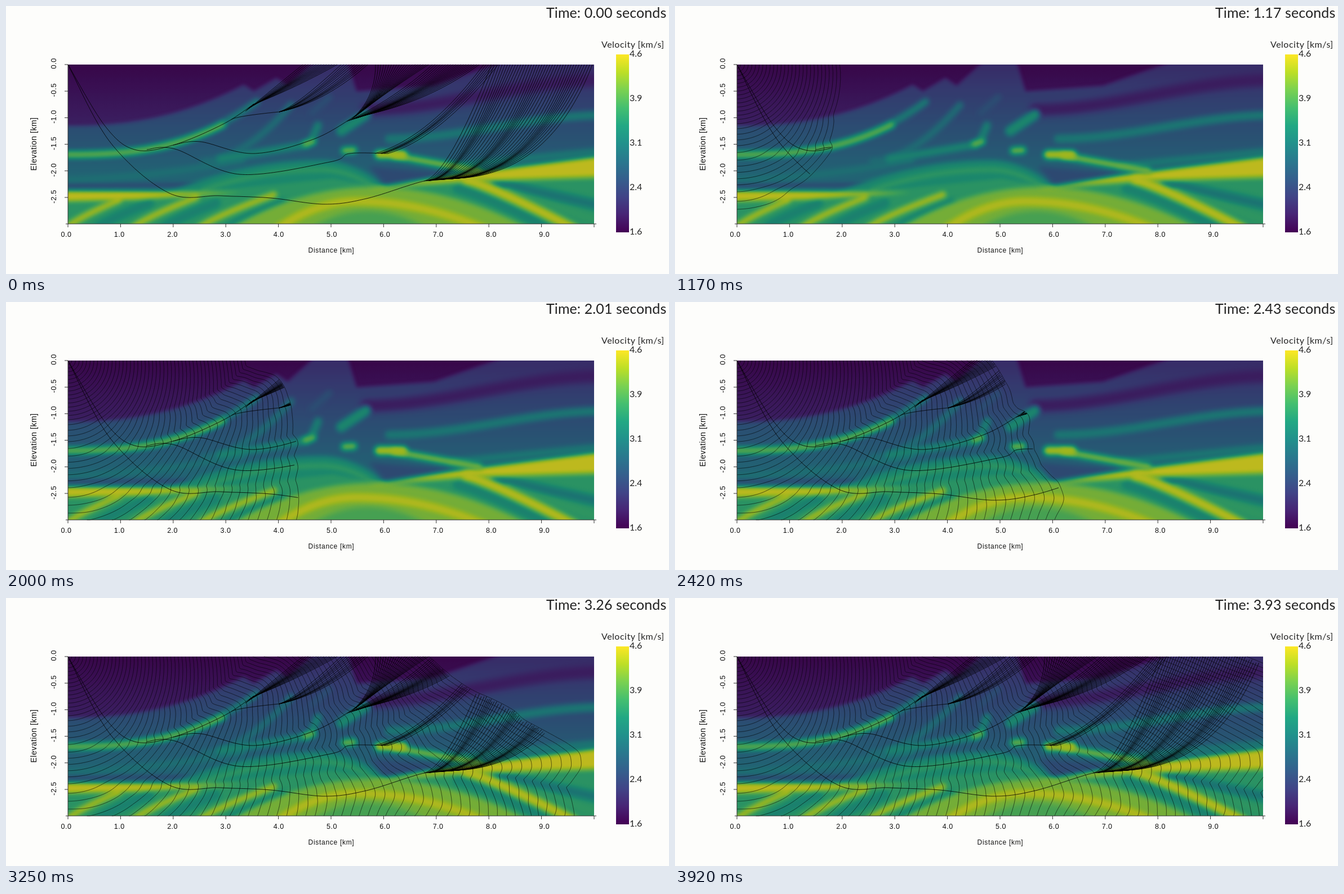
An HTML page with a canvas that plays this animation: 1177x476 px, repeating every 4010 ms.

```html
<!DOCTYPE html>
<html lang="en">
<head>
<meta charset="utf-8">
<title>Seismic rays and wavefronts</title>
<style>
  html, body { margin: 0; width: 100%; height: 100%; overflow: hidden; background: #fdfdfb; }
  #field { position: absolute; left: 110px; top: 104px; }
  svg { position: absolute; left: 0; top: 0; }
  .axis { font-family: "Liberation Sans", Arial, sans-serif; fill: #111; letter-spacing: .5px; }
  .bar { font-family: Lato, "Open Sans", sans-serif; fill: #222; }
</style>
</head>
<body>
<canvas id="field" width="934" height="283"></canvas>
<svg id="stage" width="1177" height="476" viewBox="0 0 1177 476">
  <defs><linearGradient id="scale" x1="0" y1="1" x2="0" y2="0"></linearGradient></defs>
  <g id="fronts" fill="none" stroke="#000" stroke-width=".75" stroke-opacity=".75"></g>
  <path id="rays" fill="none" stroke="#000" stroke-width=".8"/>
  <path id="ticks" fill="none" stroke="#333" stroke-width="1"/>
  <rect x="1083" y="86" width="23" height="316" fill="url(#scale)"/>
  <g id="labels"></g>
  <text class="axis" x="577.5" y="438" font-size="12" text-anchor="middle" style="letter-spacing:.7px">Distance [km]</text>
  <text class="axis" font-size="14" text-anchor="middle" transform="translate(54 245) rotate(-90)">Elevation [km]</text>
  <text class="bar" x="1057" y="74" font-size="16" letter-spacing=".5">Velocity [km/s]</text>
  <text class="bar" id="clock" x="959" y="21" font-size="25" letter-spacing=".1"></text>
</svg>
<script>
const LEFT = 110, TOP = 104, W = 934, H = 283, KM = 93.5;
const STEP = 0.0837, LAST = 47, LOOP = 4010;
const VMIN = 1.6, VSPAN = 3;
const NS = 'http://www.w3.org/2000/svg';
const $ = id => document.getElementById(id);
const mix = (a, b, f) => a + (b - a) * f;
const mixPoint = (a, b, f) => [mix(a[0], b[0], f), mix(a[1], b[1], f)];

function add(parent, tag, attrs, text) {
  const el = document.createElementNS(NS, tag);
  for (const k in attrs) el.setAttribute(k, attrs[k]);
  if (text) el.textContent = text;
  parent.appendChild(el);
  return el;
}

/* ---- curves, all returned as dense point lists ---- */
const sample = (n, f) => Array.from({ length: n + 1 }, (_, i) => f(i / n));
const pow = e => u => u ** e;
const ess = u => u * u * (3 - 2 * u);

const bend = (x0, y0, x1, y1, ease = pow(1)) =>
  sample(50, u => [mix(x0, x1, u), mix(y0, y1, ease(u))]);

// Parabola with its crest at (cx, top) and unequal half-widths
const arch = (cx, top, left, right, drop) => sample(60, u => {
  const s = 2 * u - 1;
  return [cx + s * (s < 0 ? left : right), top + drop * s * s];
});

const quad = (a, b, c) => sample(70, u => mixPoint(mixPoint(a, b, u), mixPoint(b, c, u), u));

// Catmull-Rom through a few key points
function spline(...pts) {
  return pts.slice(1).flatMap((c, i) => {
    const b = pts[i], a = pts[i - 1] || b, d = pts[i + 2] || c;
    return sample(30, u => [0, 1].map(k => 0.5 * (2 * b[k] + (c[k] - a[k]) * u +
      (2 * a[k] - 5 * b[k] + 4 * c[k] - d[k]) * u * u +
      (3 * b[k] - a[k] - 3 * c[k] + d[k]) * u ** 3)));
  });
}

/* ---- colours ---- */
const stops = ['440154', '482475', '414487', '355f8d', '2a788e', '21918c',
  '22a884', '44bf70', '7ad151', 'bddf26', 'fde725'];
const rgb = stops.map(s => [0, 2, 4].map(i => parseInt(s.substr(i, 2), 16)));
stops.forEach((s, i) => add($('scale'), 'stop', { offset: i / 10, 'stop-color': '#' + s }));

function viridis(f) {
  const i = Math.min(9, Math.floor(f * 10));
  return rgb[i].map((c, k) => mix(c, rgb[i + 1][k], f * 10 - i));
}

/* ---- velocity model, painted as grey levels ---- */
const ctx = $('field').getContext('2d', { willReadFrequently: true });
ctx.translate(-LEFT, -TOP);
ctx.lineCap = ctx.lineJoin = 'round';

function grey(v) {
  const g = (v - VMIN) / VSPAN * 255;
  return `rgb(${g},${g},${g})`;
}
function ramp(y0, v0, y1, v1) {
  const g = ctx.createLinearGradient(0, y0, 0, y1);
  g.addColorStop(0, grey(v0));
  g.addColorStop(1, grey(v1));
  return g;
}
function trace(blur, pts) {
  ctx.filter = `blur(${blur}px)`;
  ctx.beginPath();
  pts.forEach(p => ctx.lineTo(...p));
}
function band(v, width, pts, blur = 4) {
  trace(blur, pts);
  ctx.strokeStyle = grey(v);
  ctx.lineWidth = width;
  ctx.stroke();
}
function body(paint, pts, blur = 4) {
  trace(blur, pts);
  ctx.fillStyle = paint;
  ctx.fill();
}
const below = (paint, pts) => body(paint, [...pts, [1080, 420], [70, 420]], 3);

// upper sediments
ctx.fillStyle = ramp(104, 1.66, 215, 1.93);
ctx.fillRect(60, 60, 1100, 400);
below(ramp(110, 2.08, 300, 2.82), [[70, 213], ...bend(110, 213, 422, 140, pow(2.3)),
  [440, 152], [480, 128], [500, 142], [548, 98], [606, 98], [622, 152], [760, 142], [880, 100], [1080, 92]]);
band(1.88, 22, bend(640, 184, 1060, 131, ess), 6);
band(2.5, 12, bend(543, 190, 574, 162));
band(2.95, 12, bend(350, 276, 506, 176, pow(1.8)));
band(3, 11, bend(90, 309, 420, 274, pow(1.8)));
band(3.3, 13, bend(380, 272, 535, 246));
band(2.45, 7, bend(90, 320, 360, 317), 3);
band(3.15, 12, bend(105, 264, 445, 170, pow(2.65)));
band(3.95, 12, bend(105, 264, 385, 211, pow(2.65)));
band(3.1, 15, bend(680, 236, 1060, 194, ess));

// dome and deep layers
body(grey(3.38), arch(560, 274, 280, 130, 61));
below(grey(3.55), [[70, 333], [340, 331], [580, 306], [660, 320], [800, 308], [1080, 300]]);
band(3.65, 8, arch(560, 291, 210, 100, 36));
body(grey(2.45), [[643, 284], [800, 297], [675, 320]]);

// dipping stripes on the left
for (let i = 0; i < 3; i++) {
  const x = 105 + 118 * i;
  band(3.25, 15, bend(x + 55, 396, x + 150, 350, pow(0.8)));
  band(4.35, 12, bend(x, 396, x + 95 + 20 * i, 345 - 5 * i, pow(0.8)));
}
body(grey(4.5), [[70, 328], [230, 329], [420, 331], [230, 344], [70, 348]]);

// nested arches
body(grey(4.1), arch(650, 321, 265, 290, 80));
body(grey(3.8), arch(640, 364, 120, 130, 45), 5);
band(4.45, 14, arch(622, 347, 142, 230, 50));

// right flank
band(3.25, 13, bend(800, 325, 970, 398, pow(1.2)));
band(3.05, 16, bend(870, 314, 1070, 358));
band(3.6, 11, bend(890, 328, 1070, 388));
band(3.2, 10, bend(790, 284, 1070, 256), 5);
body(grey(4.5), [[640, 325], [800, 299], [1080, 263], [1080, 304], [820, 312]]);
band(4.1, 13, bend(690, 266, 840, 293));
band(4.45, 17, bend(818, 309, 1010, 396, pow(1.15)));

// small fast bodies
band(3.2, 14, bend(543, 238, 554, 212));
band(4, 12, bend(531, 245, 545, 241));
band(4, 14, bend(601, 257, 617, 256));
band(3.35, 18, bend(595, 222, 639, 193));
band(4.35, 17, bend(662, 264, 705, 264));
ctx.filter = 'none';

const img = ctx.getImageData(0, 0, W, H);
const speed = (x, y) =>
  VMIN + VSPAN * img.data[4 * (Math.min(y, H - 1) * W + Math.min(x, W - 1))] / 255;

/* ---- travel times by fast sweeping ---- */
const CELL = 2, NX = W / CELL + 1, NY = Math.ceil(H / CELL) + 1, h = CELL / KM;
const slow = new Float32Array(NX * NY), time = new Float32Array(NX * NY).fill(9);
for (let j = 0; j < NY; j++) for (let i = 0; i < NX; i++) {
  const n = j * NX + i, r = Math.hypot(i, j);
  slow[n] = h / speed(i * CELL, j * CELL);
  if (r < 12) time[n] = r * h / 1.7;
}
function sweep(right, down) {
  for (let b = 0; b < NY; b++) for (let a = 0; a < NX; a++) {
    const i = right ? a : NX - 1 - a, j = down ? b : NY - 1 - b, n = j * NX + i;
    const p = Math.min(i ? time[n - 1] : 9, i < NX - 1 ? time[n + 1] : 9);
    const q = Math.min(j ? time[n - NX] : 9, j < NY - 1 ? time[n + NX] : 9);
    const s = slow[n], d = Math.abs(p - q);
    const t = d >= s ? Math.min(p, q) + s : (p + q + Math.sqrt(2 * s * s - d * d)) / 2;
    if (t < time[n]) time[n] = t;
  }
}
for (let n = 0; n < 16; n++) sweep(n & 1, n & 2);

function timeAt(x, y) {
  const gx = Math.max(0, Math.min(NX - 1.01, (x - LEFT) / CELL));
  const gy = Math.max(0, Math.min(NY - 1.01, (y - TOP) / CELL));
  const i = Math.floor(gx), j = Math.floor(gy), n = j * NX + i;
  return mix(mix(time[n], time[n + 1], gx - i),
    mix(time[n + NX], time[n + NX + 1], gx - i), gy - j);
}

for (let n = 0; n < img.data.length; n += 4) {
  viridis(img.data[n] / 255).forEach((c, k) => img.data[n + k] = c * 0.81);
}
ctx.putImageData(img, 0, 0);

/* ---- wavefronts: two contours per time step ---- */
const GAP = STEP / 2, lines = Array.from({ length: 2 * LAST + 1 }, () => []);
function slice(...nodes) {
  const [a, b, c] = nodes.sort((m, n) => time[m] - time[n]);
  const cut = (m, n, t) => {
    const f = (t - time[m]) / (time[n] - time[m] || 1);
    const x = mix(m % NX, n % NX, f), y = mix(Math.floor(m / NX), Math.floor(n / NX), f);
    return (LEFT + x * CELL).toFixed(1) + ' ' + Math.min(TOP + H, TOP + y * CELL).toFixed(1);
  };
  for (let k = Math.ceil(time[a] / GAP); k * GAP < time[c] && k <= 2 * LAST; k++) {
    const t = k * GAP;
    if (k) lines[k].push('M' + cut(a, c, t) + 'L' + (t < time[b] ? cut(a, b, t) : cut(b, c, t)));
  }
}
for (let j = 0; j < NY - 1; j++) for (let i = 0; i < NX - 1; i++) {
  const n = j * NX + i;
  slice(n, n + 1, n + NX);
  slice(n + 1, n + NX, n + NX + 1);
}
const fronts = lines.map(l => add($('fronts'), 'path', { d: l.join('') }));

/* ---- rays: shared trunks, then fans to evenly spaced receivers ---- */
const rays = [];
function ray(pts) {
  let t = 0;
  rays.push(pts.map(([x, y]) => {
    t = Math.max(t, timeAt(x, y));
    return { t, s: x.toFixed(1) + ' ' + y.toFixed(1) };
  }));
}
// Each side is [start, control, receiver x]; rays bunch into groups below the surface
function fan(groups, [p0, c0, x0], [p1, c1, x1]) {
  const n = Math.round((x1 - x0) / 4.67), w = 2 * Math.PI * groups;
  for (let i = 0; i <= n; i++) {
    const f = i / n, g = f + 0.8 * Math.sin(w * f) / w;
    ray(quad(mixPoint(p0, p1, g), mixPoint(c0, c1, g), [mix(x0, x1, f), TOP]));
  }
}
const origin = [LEFT, TOP];
ray(spline(origin, [175, 212], [228, 255], [297, 247], [385, 210], [440, 174]));
ray(spline([297, 247], [345, 241], [440, 262], [550, 235], [632, 187]));
ray(spline([250, 255], [300, 254], [415, 299], [575, 277], [610, 262], [678, 262]));
ray(spline(origin, [185, 242], [289, 332], [380, 337], [470, 341], [565, 352], [640, 342], [742, 311], [800, 306]));
ray(bend(400, 202, 485, 188, pow(0.6)));

fan(1, [[425, 187], [480, 142], 527], [[438, 175], [505, 150], 588]);
fan(2, [[485, 188], [515, 178], 595], [[485, 188], [565, 172], 642]);
fan(1, [[612, 202], [656, 165], 656], [[632, 187], [680, 150], 750]);
fan(1, [[605, 205], [690, 165], 757], [[640, 193], [750, 170], 840]);
fan(1, [[655, 262], [750, 235], 848], [[678, 262], [770, 235], 874]);
fan(3, [[742, 311], [785, 300], 862], [[800, 306], [965, 300], 1041]);

/* ---- axes ---- */
let ticks = `M${LEFT - 4} ${TOP + H}H1048M${LEFT} ${TOP}V${TOP + H}`;
for (let i = 0; i <= 10; i++) {
  ticks += `M${LEFT + i * 93.4} ${TOP + H}v6`;
  if (i < 10) add($('labels'), 'text',
    { class: 'axis', x: 107 + 94.3 * i, y: 409.5, 'font-size': 12.5, 'text-anchor': 'middle' }, i.toFixed(1));
}
for (let i = 0; i < 6; i++) {
  ticks += `M${LEFT - 6} ${TOP + i * 47.2}h6`;
  add($('labels'), 'text', {
    class: 'axis', 'font-size': 13, 'text-anchor': 'middle',
    transform: `translate(89 ${102 + 47.3 * i}) rotate(-90)`
  }, i ? (-i / 2).toFixed(1) : '0.0');
}
$('ticks').setAttribute('d', ticks);
for (let i = 0; i < 5; i++) {
  const v = 4.6 - 0.75 * i;
  add($('labels'), 'text', { class: 'bar', x: 1107, y: 90 + 79 * i, 'font-size': 16 }, (v + 0.001).toFixed(1));
}

/* ---- playback ---- */
let shown = -1;
function show(k) {
  if (k === shown) return;
  shown = k;
  const now = k ? k * STEP : Infinity;   // the loop opens on the complete rays
  $('clock').textContent = `Time: ${(k * STEP).toFixed(2)} seconds`;
  fronts.forEach((p, i) => p.style.display = i <= 2 * k ? '' : 'none');
  $('rays').setAttribute('d', rays.map(r => {
    const part = r.filter(p => p.t <= now);
    return part.length > 1 ? 'M' + part.map(p => p.s).join('L') : '';
  }).join(''));
}
function stepAt(ms) {
  const k = Math.min(LAST, Math.floor((ms + 5) * 3 / 250));
  return Math.round(k * 25 / 3) * 10 > ms ? k - 1 : k;
}
const start = performance.now();
function tick() {
  show(stepAt((performance.now() - start) % LOOP));
  requestAnimationFrame(tick);
}
show(0);
tick();
</script>
</body>
</html>
```
